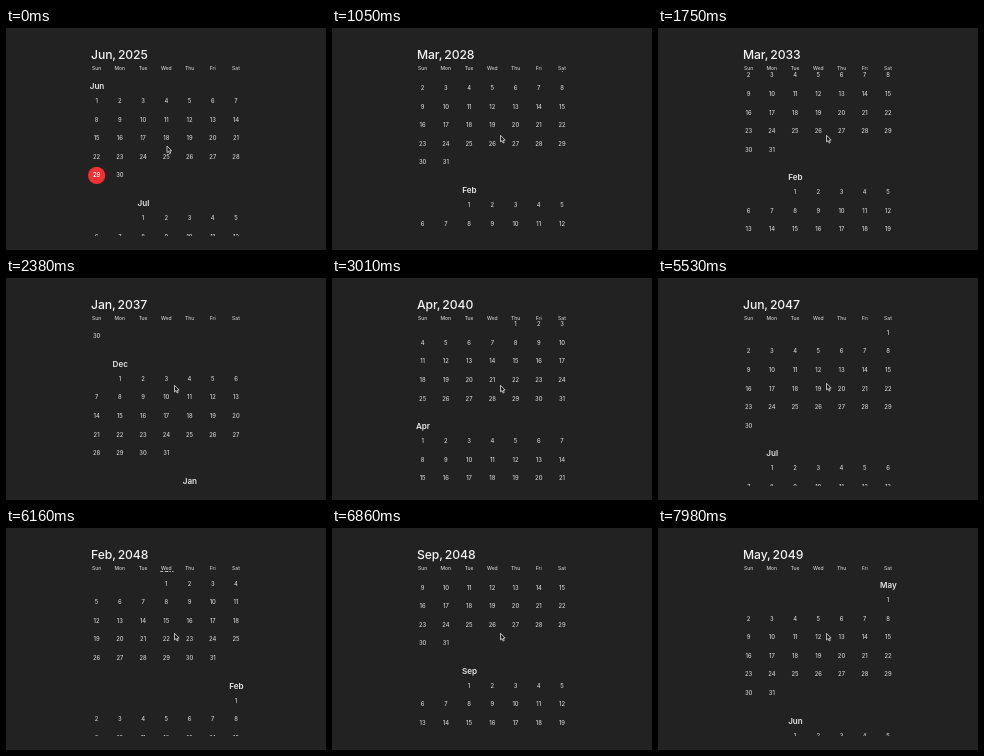
These frames come from a looping animation (320 px wide and 222 px high, 8000 ms). An HTML page with a canvas:

```html
<!DOCTYPE html>
<html lang="en">
<head>
<meta charset="utf-8">
<title>Scrolling calendar</title>
<style>
  html, body { margin: 0; width: 100%; height: 100%; overflow: hidden; background: #222; }
  canvas { display: block; width: 320px; height: 222px; }
</style>
</head>
<body>
<canvas id="stage"></canvas>
<script>
const W = 320, H = 222, LOOP = 8000, STEP = 70;
const ROW = 18.55, LABEL_GAP = 14.8, MONTH_GAP = 27.9;
const VIEW_TOP = 43, VIEW_BOTTOM = 208;
const TITLE_LEAD = 14, TITLE_LINE = 149;
const NAMES = 'Jan Feb Mar Apr May Jun Jul Aug Sep Oct Nov Dec'.split(' ');
const WEEKDAYS = 'Sun Mon Tue Wed Thu Fri Sat'.split(' ');

const canvas = document.getElementById('stage');
const ctx = canvas.getContext('2d');
const ratio = window.devicePixelRatio || 1;
canvas.width = W * ratio;
canvas.height = H * ratio;
ctx.scale(ratio, ratio);

const columnX = c => 90.6 + c * 23.23;

// Each month knows its first weekday, length and the place of its label.
const months = [];
for (let i = 0, top = 0; i < 300; i++) {
  const date = new Date(2025, 5 + i, 1);
  const year = date.getFullYear(), month = date.getMonth();
  const first = date.getDay();
  const days = new Date(year, month + 1, 0).getDate();
  const rows = Math.ceil((first + days) / 7);
  months.push({ year, name: NAMES[month], first, days, top });
  top += LABEL_GAP + (rows - 1) * ROW + MONTH_GAP;
}

// At the given time the label of the month passes height y.
function key(time, label, y) {
  const month = months.find(m => `${m.name} ${m.year}` === label);
  return { time, pos: month.top - y };
}

const flings = [
  [key(700, 'Jun 2025', 58.3), key(1750, 'Feb 2033', 149.4),
   key(3010, 'Apr 2040', 148.3), key(3430, 'Sep 2041', 150)],
  [key(3500, 'Sep 2041', 150), key(3990, 'Feb 2044', 96.3), key(5040, 'Jul 2047', 200)],
  [key(5530, 'Jul 2047', 175.4), key(6860, 'Sep 2048', 143), key(7980, 'May 2049', 57.3)]
];

// A fling sets off at full speed, slows smoothly through its keys and comes to rest.
for (const keys of flings) {
  const chord = i => (keys[i + 1].pos - keys[i].pos) / (keys[i + 1].time - keys[i].time);
  keys.forEach((k, i) => {
    if (i === 0) k.speed = chord(0);
    else if (i === keys.length - 1) k.speed = 0;
    else k.speed = (chord(i - 1) + chord(i)) / 2;
  });
}

function scrollAt(t) {
  const keys = flings.filter(f => f[0].time <= t).pop() || flings[0];
  const next = keys.findIndex(k => k.time > t);
  if (next === 0) return keys[0].pos;
  if (next < 0) return keys[keys.length - 1].pos;
  const a = keys[next - 1], b = keys[next];
  const d = b.time - a.time, p = (t - a.time) / d, q = 1 - p;
  return a.pos * (1 + 2 * p) * q * q + b.pos * (3 - 2 * p) * p * p
       + d * p * q * (a.speed * q - b.speed * p);
}

function text(str, x, y, size, weight, color, align = 'center') {
  ctx.font = `${weight} ${size}px Inter, "Liberation Sans", sans-serif`;
  ctx.textAlign = align;
  ctx.fillStyle = color;
  ctx.fillText(str, x, y + size * 0.364);
}

function drawMonth(m, y) {
  text(m.name, columnX(m.first) + 0.4, y, 8.1, 600, '#e4e4e4');
  for (let day = 1; day <= m.days; day++) {
    const cell = m.first + day - 1;
    const x = columnX(cell % 7);
    const dy = y + LABEL_GAP + Math.floor(cell / 7) * ROW;
    const today = m === months[0] && day === 29;
    if (today) {
      ctx.fillStyle = '#f23134';
      ctx.beginPath();
      ctx.arc(x, dy, 8.6, 0, Math.PI * 2);
      ctx.fill();
    }
    text(day, x, dy, 5.8, today ? 700 : 500, today ? '#fff' : '#d0d0d0');
  }
}

function drawHeader(t) {
  const ahead = scrollAt(t + TITLE_LEAD) + TITLE_LINE;
  const m = months.filter(month => month.top <= ahead).pop();
  ctx.save();
  ctx.letterSpacing = '-0.1px';
  ctx.wordSpacing = '-1.2px';
  text(`${m.name}, ${m.year}`, 85, 27, 12.2, 500, '#f2f2f2', 'left');
  ctx.restore();
  WEEKDAYS.forEach((name, c) => text(name, columnX(c), 40, 5, 500, '#cacaca'));
}

const arrow = new Path2D('M0 0V6.6L1.5 5.3L2.6 7.7L3.7 7.2L2.7 4.8H4.7Z');

function drawCursor(t) {
  const p = Math.min(1, Math.max(0, (t - 420) / 140));
  ctx.save();
  ctx.translate(161 + 7.5 * p, 118 - 10.7 * p - (t >= 3570 ? 2 : 0));
  ctx.fillStyle = '#1a1a1a';
  ctx.strokeStyle = '#dedede';
  ctx.lineWidth = 0.8;
  ctx.fill(arrow);
  ctx.stroke(arrow);
  ctx.restore();
}

function draw(t) {
  const scroll = scrollAt(t);
  ctx.fillStyle = '#222';
  ctx.fillRect(0, 0, W, H);
  ctx.save();
  ctx.beginPath();
  ctx.rect(0, VIEW_TOP, W, VIEW_BOTTOM - VIEW_TOP);
  ctx.clip();
  for (const m of months) {
    const y = m.top - scroll;
    if (y > -120 && y < VIEW_BOTTOM + 10) drawMonth(m, y);
  }
  ctx.restore();
  drawHeader(t);
  drawCursor(t);
}

const start = performance.now();
function tick() {
  const t = (performance.now() - start) % LOOP;
  draw(Math.floor(t / STEP) * STEP);
  requestAnimationFrame(tick);
}
tick();
</script>
</body>
</html>
```
